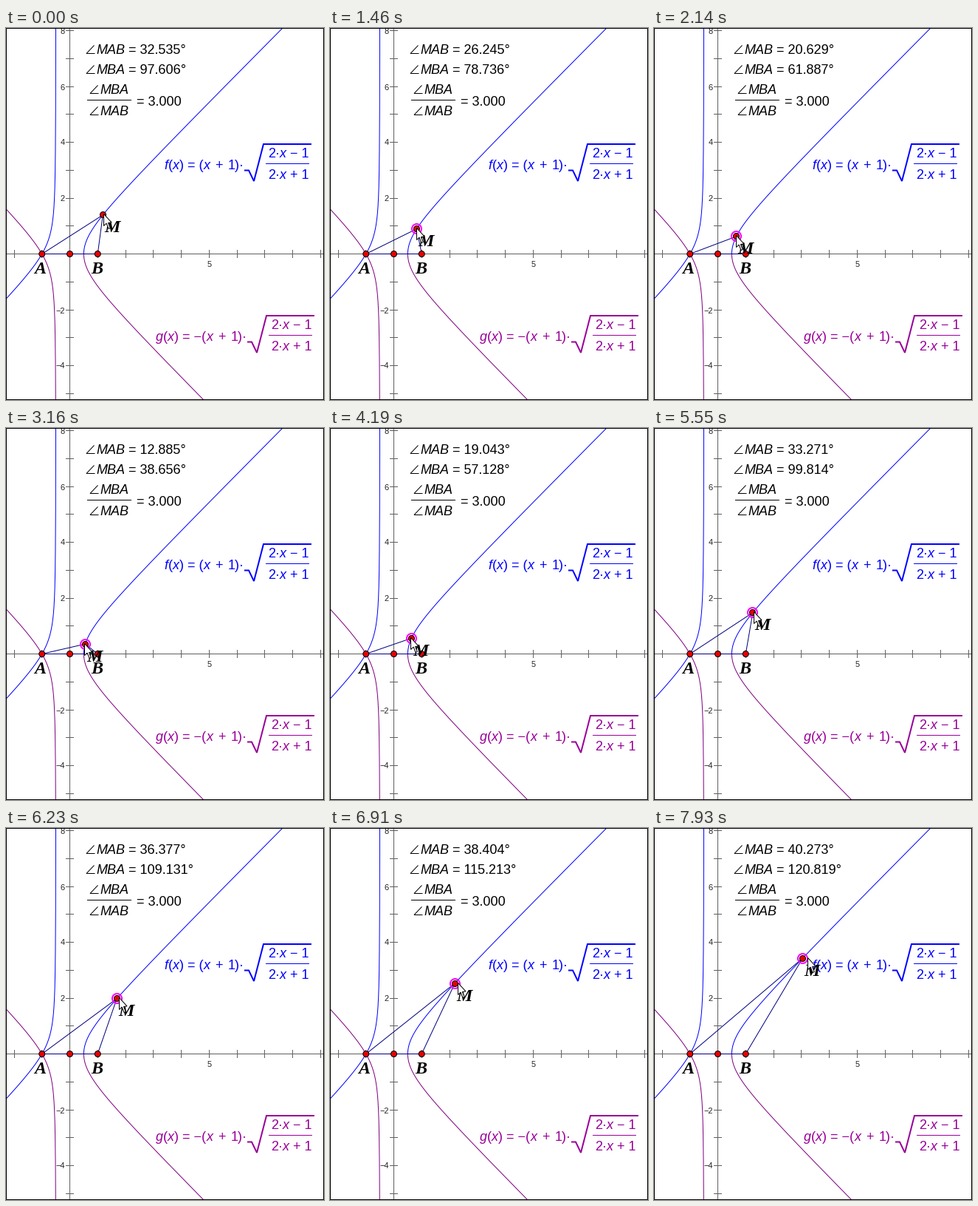
A matplotlib script that plays this animation: 431 by 503 pixels, repeating every 8 s.

```python
import numpy as np
import matplotlib.pyplot as plt
from matplotlib.animation import FuncAnimation
from matplotlib.patches import Circle, Polygon, Rectangle

plt.rcParams["path.snap"] = False
W, H, DPI = 431, 503, 72          # at 72 dpi one point is one pixel
STEP, LOOP = 20, 8000
OX, OY, UNIT = 86.5, 305.5, 37.75
BLUE, PURPLE, NAVY, GRAY = "#0000ff", "#990099", "#000080", "#606060"

fig = plt.figure(figsize=(W / DPI, H / DPI), dpi=DPI, facecolor="white")
ax = fig.add_axes([0, 0, 1, 1])
ax.set_xlim(0, W)
ax.set_ylim(H, 0)
ax.axis("off")


def to_px(x, y):
    return OX + UNIT * x, OY - UNIT * y


def line(xs, ys, color, width=1.0, z=2):
    return ax.plot(xs, ys, color=color, lw=width, zorder=z,
                   solid_joinstyle="miter", solid_capstyle="butt")[0]


def text(x, y, s, color="black", size=18, style="normal", z=3, **kw):
    kw.setdefault("family", "Liberation Sans")
    return ax.text(x, y, s, color=color, fontsize=size, style=style,
                   va="baseline", zorder=z, **kw)


def italic(x, y, s, color="black"):
    return text(x, y, s, color, style="italic")


def point_name(x, y, s):
    return text(x, y, s, size=24, style="italic", weight="bold",
                family="Liberation Serif", z=8)


def dot(x, y, z):
    return ax.add_patch(Circle((x, y), 4, fc="#e60000", ec="black", lw=1, zorder=z))


def angle_name(x, y, s):
    line([x + 11.5, x + 1, x + 12.5], [y - 11.5, y - 0.5, y - 0.5], "black")
    italic(x + 14, y, s)


def draw_axes():
    line([0, W], [OY, OY], GRAY, z=1)
    line([OX, OX], [0, H], GRAY, z=1)
    for n in range(-5, 10):
        x, y = np.floor(to_px(n, n)) + 0.5
        if n:
            line([x, x], [OY - 5.5, OY + 5.5], GRAY, z=1)
            line([OX - 5.5, OX + 5.5], [y, y], GRAY, z=1)
        if n and n % 2 == 0:
            label = str(n).replace("-", "−")
            text(80, y + 4, label, "#202020", 11, ha="right")
    text(to_px(5, 0)[0], 323, "5", "#202020", 11, ha="center")


def draw_curves():
    left = -0.5 - np.geomspace(0.002, 2, 300)
    right = 0.5 + np.linspace(0, 3, 300) ** 2
    for xs in (left, right):
        ys = (xs + 1) * np.sqrt((2 * xs - 1) / (2 * xs + 1))
        line(*to_px(xs, ys), BLUE)
        line(*to_px(xs, -ys), "#800080")


def draw_root(dx, dy, color):
    """The shared tail 'x + 1) * sqrt((2x - 1) / (2x + 1))'."""
    base = 191 + dy
    italic(268 + dx, base, "x", color)
    text(283 + dx, base, "+", color)
    text(301 + dx, base, "1)·", color)
    hook = np.array([(323, 192.5), (329, 192.5), (336, 207), (349, 157), (414, 157)])
    line(hook[:, 0] + dx, hook[:, 1] + dy, color, 2)
    line([352 + dx, 411 + dx], [183.5 + dy] * 2, color)
    for y, sign in ((175, "−"), (204, "+")):
        text(355 + dx, y + dy, "2·", color)
        italic(371 + dx, y + dy, "x", color)
        text(385 + dx, y + dy, sign + " 1", color)


def draw_formula(x, y, name, gap, rest, color):
    italic(x, y, name, color)
    text(x + gap, y, "(", color)
    italic(x + gap + 6, y, "x", color)
    text(x + gap + 15, y, rest, color)


def draw_measures():
    angle_name(108, 35, "MAB")
    angle_name(108, 62, "MBA")
    angle_name(113, 89, "MBA")
    angle_name(113, 118, "MAB")
    line([110, 170], [97.5, 97.5], "black")
    text(177, 105, "= 3.000")


draw_axes()
draw_curves()
draw_formula(214, 191, "f", 6, ") = (", BLUE)
draw_formula(203, 423, "g", 10, ") = −(", PURPLE)
draw_root(0, 0, BLUE)
draw_root(4, 232, PURPLE)
draw_measures()

A, B = to_px(-1, 0), to_px(1, 0)
for px in (A[0], OX, B[0]):
    dot(px, OY, 5)
point_name(38.5, 332, "A")
point_name(115.5, 332, "B")
ax.add_patch(Rectangle((0.5, 0.5), W - 1, H - 1, fill=False, ec="black", lw=1, zorder=10))

mab = text(166, 35, "")
mba = text(166, 62, "")
triangle = Polygon([A, A, B], fill=False, ec=NAVY, lw=1, zorder=4)
ring = Circle(A, 6.5, fill=False, ec="#ff00ff", lw=2, zorder=6)
dot_m = dot(*A, 7)
name_m = point_name(0, 0, "M")
ARROW = np.array([(0, 0), (0, 16), (3.6, 12.6), (6.6, 20), (8.8, 19),
                  (6, 12), (10.5, 11.4)])
arrow = Polygon(ARROW, fc="white", ec="black", lw=1, zorder=9)
for patch in (triangle, ring, arrow):
    ax.add_patch(patch)


def curve_point(b):
    """Point M on the curve for which angle MBA is b degrees and MAB is b / 3."""
    a = np.radians(b / 3)
    x = 0.5 / np.cos(2 * a)
    return x, (x + 1) * np.tan(a)


# The drag moves in even jumps, with a rest at the lowest place;
# between the key angles M rises and falls at a steady rate.
JUMPS = np.r_[0, 780:2821:340, 4190:LOOP:340]
KEY_TIMES = [440, 1460, 2820, 3850, 4870, 6230, 6910, 7930]
KEY_ANGLES = np.array([97.606, 78.736, 38.656, 38.656, 82.843, 109.131, 115.213, 120.819])
KEY_HEIGHTS = curve_point(KEY_ANGLES)[1]
GRID = np.linspace(30, 125, 5000)
GRID_HEIGHTS = curve_point(GRID)[1]


def angle_at(t):
    jump = JUMPS[JUMPS <= t][-1]
    height = np.interp(jump, KEY_TIMES, KEY_HEIGHTS)
    return np.interp(height, GRID_HEIGHTS, GRID)


def update(i):
    t = i * STEP + STEP / 2
    b = angle_at(t)
    x, y = curve_point(b)
    mx, my = to_px(x, y)
    center = np.floor((mx, my)) + 0.5

    mab.set_text(f"= {b / 3:.3f}°")
    mba.set_text(f"= {b:.3f}°")
    triangle.set_xy([A, (mx, my), B])
    dot_m.set_center(center)
    ring.set_center(center)
    ring.set_visible(t >= 100)
    name_m.set_position((mx + 2, my + 23.5))
    # The pointer runs ahead of M as it climbs.
    arrow.set_xy(ARROW + center + (np.round(2.5 * y - 2), -1))
    return mab, mba, triangle, ring, dot_m, name_m, arrow


anim = FuncAnimation(fig, update, frames=LOOP // STEP, interval=STEP,
                     repeat=True, repeat_delay=0, blit=False)
plt.show()
```
